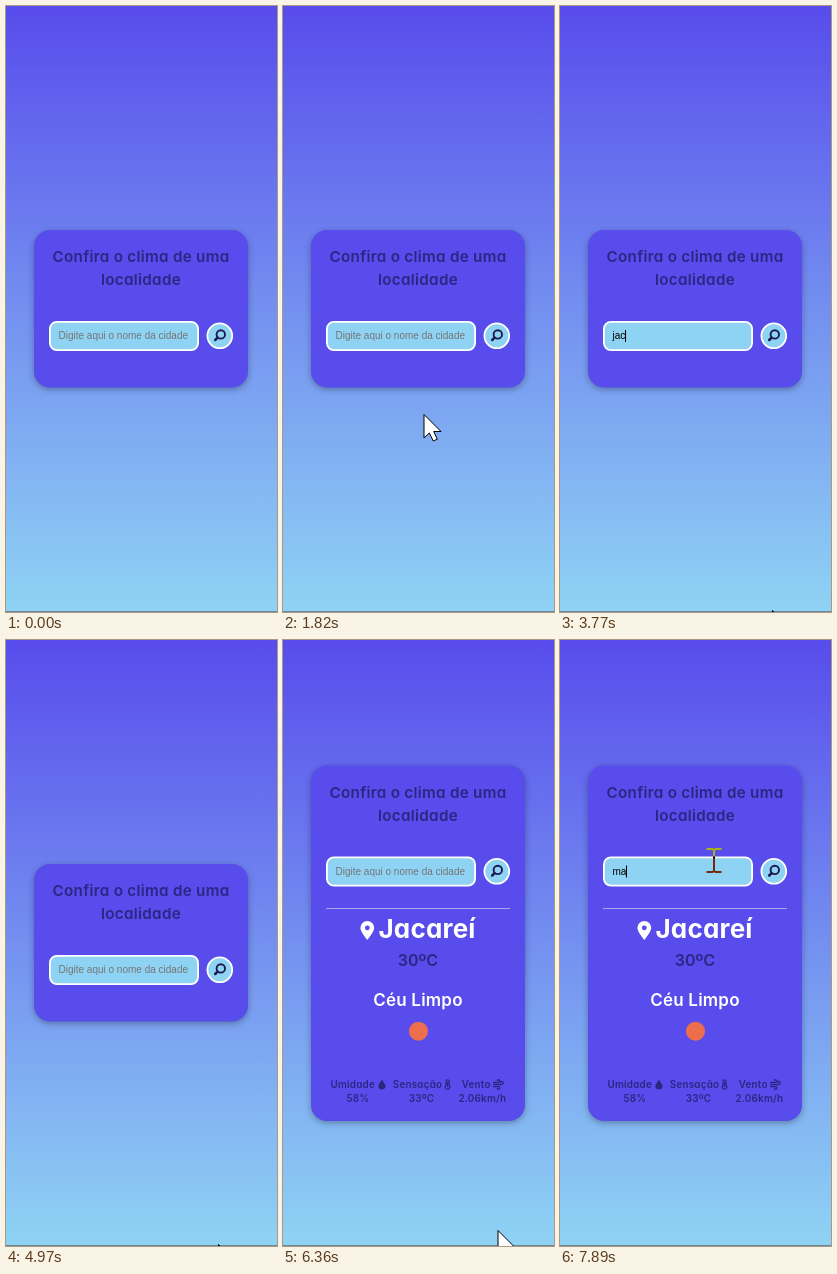
Write an HTML page that moves like this. It is 271 px wide and 606 px high and loops after 8 s.

```html
<!DOCTYPE html>
<html lang="pt-BR">
<head>
<meta charset="utf-8">
<title>Clima</title>
<style>
  html, body { margin: 0; width: 100%; height: 100%; overflow: hidden; background: #584cec; }
  svg { display: block; width: 100vw; height: 100vh; }
  text {
    font-family: Inter, "Open Sans", sans-serif;
    font-feature-settings: "cv11";
    font-weight: 600;
    fill: #2b2682;
    text-anchor: middle;
  }
  .title { font-size: 15.2px; letter-spacing: .3px; }
  .city { font-size: 26px; font-weight: 700; fill: #fff; letter-spacing: .2px; }
  .temp { font-size: 16px; }
  .sky { font-size: 17px; fill: #fff; letter-spacing: .2px; }
  .info text { font-size: 9.8px; letter-spacing: .25px; }
  .field text {
    font: 10px "Liberation Sans", Arial, sans-serif;
    text-anchor: start;
    fill: #000;
  }
  .field .hint { fill: #757575; }
  .card { fill: #584cec; filter: drop-shadow(0 2px 3px rgba(0, 0, 0, .3)); }
  .box { fill: #8fd3f4; stroke: #fff; stroke-width: 1.8; }
  .ink { fill: #2b2682; }
  .line { fill: none; stroke: #2b2682; stroke-width: 1.3; stroke-linecap: round; }
  #beam { mix-blend-mode: difference; }
</style>
</head>
<body>
<svg viewBox="0 0 271 606" preserveAspectRatio="none">
  <defs>
    <linearGradient id="sky" x1="0" y1="0" x2="0" y2="1">
      <stop offset="0" stop-color="#584cec"/>
      <stop offset="1" stop-color="#8fd3f4"/>
    </linearGradient>
  </defs>
  <rect width="271" height="606" fill="url(#sky)"/>
  <rect y="605" width="271" height="1" fill="#66879c"/>
  <rect id="card" class="card" x="28" width="214" rx="16"/>

  <g id="form">
    <text class="title" x="135" y="256">Confira o clima de uma</text>
    <text class="title" x="135" y="279">localidade</text>
    <g class="field">
      <rect class="box" x="43.9" y="315.9" width="148.2" height="28.2" rx="7"/>
      <text id="hint" class="hint" x="52.5" y="333">Digite aqui o nome da cidade</text>
      <text id="typed" x="52.5" y="333"></text>
      <rect id="caret" y="324" width="1" height="12"/>
    </g>
    <circle class="box" cx="213.8" cy="329.8" r="12.4"/>
    <g fill="none" stroke="#1c194f">
      <circle cx="214.8" cy="328.4" r="4.2" stroke-width="1.9"/>
      <path d="M211.6 331.6L209.2 334" stroke-width="2.5" stroke-linecap="round"/>
    </g>
  </g>

  <g id="result">
    <rect x="43" y="268" width="184" height="1" fill="#aaa5f4"/>
    <path fill="#fff" fill-rule="evenodd"
      d="M84.3 300C82 297 77.4 291.500 77.400 287.800A6.900 6.900 0 0 1 91.200 287.800C91.200 291.500 86.600 297 84.300 300ZM84.300 285.400a2.400 2.400 0 1 0 .01 0Z"/>
    <text class="city" x="144" y="298">Jacareí</text>
    <text class="temp" x="135" y="326">30ºC</text>
    <text class="sky" x="135" y="366">Céu Limpo</text>
    <circle cx="135.500" cy="391.300" r="9.500" fill="#ec6e4c"/>
    <g class="info">
      <text x="69.700" y="448">Umidade</text>
      <text x="75" y="462">58%</text>
      <text x="134.500" y="448">Sensação</text>
      <text x="138.500" y="462">33ºC</text>
      <text x="193.200" y="448">Vento</text>
      <text x="199.300" y="462">2.06km/h</text>
    </g>
    <path class="ink" d="M98.900 439.400C100 442 102.500 443.800 102.500 446A3.600 3.500 0 0 1 95.300 446C95.300 443.800 97.800 442 98.900 439.400Z"/>
    <path class="line" d="M163.100 445V441.300a1.500 1.500 0 0 1 3 0V445a2.300 2.300 0 1 1-3 0Z"/>
    <path class="line" d="M164.600 442.500V446.500"/>
    <path class="line" d="M210.600 442.300H215.500a1.300 1.300 0 1 0-1.200-1.900M210.600 444.500H218.800a1.500 1.500 0 1 0-1.300-2.300M210.600 446.700H215.500a1.300 1.300 0 1 1-1.200 1.900"/>
  </g>

  <path id="arrow" fill="#fff" stroke="#000" stroke-linejoin="miter"
    d="M0 .5V24L5.400 19L9.200 27L13.300 25.200L9.700 17.500H17Z"/>
  <path id="beam" fill="none" stroke="#fff" stroke-width="2"
    d="M-7.500 -11.500H-1.500L0 -10.500L1.500 -11.500H7.500M0 -10.500V10.500M-7.500 11.500H-1.500L0 10.500L1.500 11.500H7.500"/>
</svg>
<script>
  const LOOP = 8000, OPEN = 5040, LIFT = -98.5;
  const $ = id => document.getElementById(id);
  const [card, form, result, hint, typed, caret, arrow, beam] =
    ["card", "form", "result", "hint", "typed", "caret", "arrow", "beam"].map($);

  // Pointer samples, each held until the next: time, shape, x, y
  const pointer = [
    [0], [1220, arrow, 259, 589], [1280],
    [1550, arrow, 263, 596], [1610, arrow, 238, 546], [1680, arrow, 202, 488],
    [1750, arrow, 168, 440], [1820, arrow, 141, 408], [1890, arrow, 129, 376],
    [1960, beam, 137, 341], [2030, beam, 137, 329], [2100, beam, 137, 325],
    [2360, beam, 137, 318], [2430, beam, 138, 321], [2500, arrow, 146, 388],
    [2570, arrow, 167, 496], [2640, arrow, 172, 578], [2710],
    [2910, arrow, 212.500, 604],
    [6360, arrow, 215, 590], [6430, arrow, 219, 540], [6500, arrow, 221, 462],
    [6570, arrow, 206, 350], [6640, arrow, 172, 268], [6700, beam, 158, 238],
    [6770, beam, 155, 229.500], [6840, beam, 155, 222], [6970, beam, 156, 214],
    [7150, beam, 158, 220.500], [7230, beam, 155, 228], [7300, beam, 152, 233.500],
    [7560, beam, 153, 228], [7690, beam, 154, 220.500]
  ];

  const words = [
    [0, ""], [3440, "j"], [3580, "ja"], [3770, "jac"], [3840, "jaca"],
    [4100, "jacar"], [4300, "jacare"], [4440, "jacarei"], [4770, ""],
    [7760, "m"], [7890, "ma"]
  ];

  const carets = [
    [0, 0], [2430, 1], [2980, 0], [3440, 1], [4970, 0], [5500, 1],
    [6030, 0], [6560, 1], [7090, 0], [7620, 1]
  ];

  const at = (list, t) => list.findLast(k => k[0] <= t);
  const show = (el, on) => { el.style.display = on ? "" : "none"; };

  function draw() {
    const t = performance.now() % LOOP;
    const open = t >= OPEN;
    card.setAttribute("y", open ? 125.500 : 224);
    card.setAttribute("height", open ? 355.500 : 157.500);
    form.setAttribute("transform", `translate(0 ${open ? LIFT : 0})`);
    show(result, open);

    const word = at(words, t)[1];
    if (typed.textContent !== word) typed.textContent = word;
    show(hint, !word);
    show(caret, at(carets, t)[1]);
    caret.setAttribute("x", 52 + Math.round(word ? typed.getComputedTextLength() : 0));

    const [, shape, x, y] = at(pointer, t);
    for (const el of [arrow, beam]) show(el, el === shape);
    if (shape) shape.setAttribute("transform", `translate(${x} ${y})`);
    requestAnimationFrame(draw);
  }
  draw();
</script>
</body>
</html>
```
